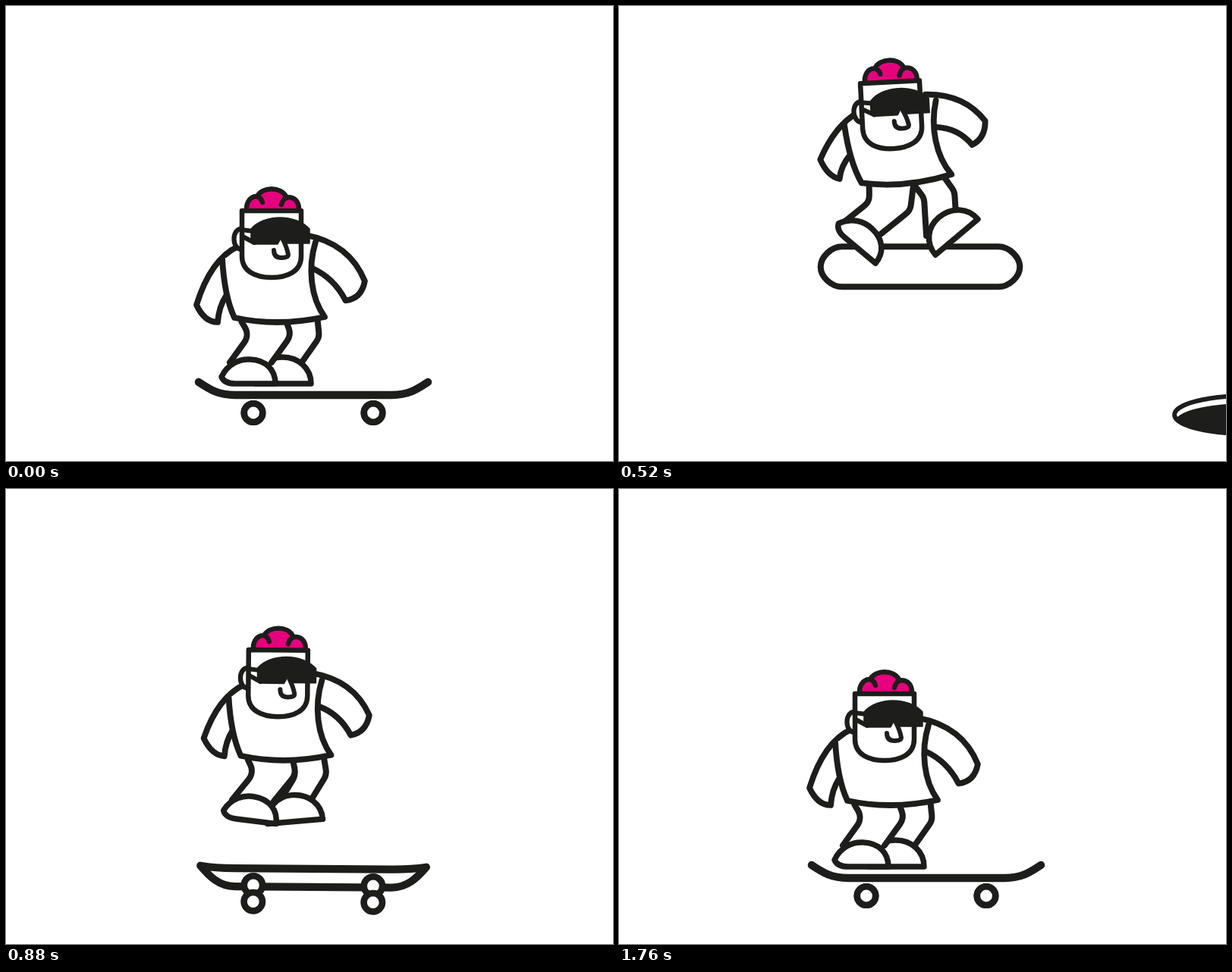
Write an HTML page with a canvas that moves like this. It is 800 by 600 pixels and loops after 1970 ms.

```html
<!DOCTYPE html>
<html lang="en">
<head>
<meta charset="utf-8">
<title>Kickflip</title>
<style>
  html, body { margin: 0; width: 100%; height: 100%; overflow: hidden; background: #fff; }
  canvas { display: block; }
</style>
</head>
<body>
<canvas id="stage" width="800" height="600"></canvas>
<script>
const ctx = document.getElementById('stage').getContext('2d');
const INK = '#1d1d1b', PINK = '#e6007e', LOOP = 1970;
const HOLDS = [1760, 1680, 1520, 1440, 1360];

// Parts are x, y, angle; knees are x, y. Jump height is added by hop().
const rest = {
  head: [350, 270, 0], torso: [360.5, 410.5, 0], raise: [0], board: [405, 513, 0],
  leftKnee: [321, 434], leftFoot: [355, 498, 0],
  rightKnee: [372, 437], rightFoot: [402, 498, 0]
};
const pop = {
  head: [288, 260.5, -5], torso: [308.5, 418.5, -5], raise: [24], board: [383, 474.5, -32],
  leftKnee: [276, 458], leftFoot: [316, 518, -5],
  rightKnee: [324, 446], rightFoot: [358, 488, -5]
};
const spread = {
  head: [357, 288, -3], torso: [379, 415.5, -5], raise: [11], board: [397, 488, 0],
  leftKnee: [330, 446], leftFoot: [338, 527, 40],
  rightKnee: [402, 441], rightFoot: [473, 469, -40]
};
const land = {
  head: [406.5, 291.5, 3.5], torso: [414.5, 422, 0], raise: [12], board: [404.5, 511, 2.5],
  leftKnee: [360, 442], leftFoot: [361, 527, 45],
  rightKnee: [434, 447], rightFoot: [501, 484, -33]
};
const KEYS = [[0, rest], [80, rest], [320, pop], [520, spread], [760, land], [920, rest]];

const P = d => new Path2D(d);
const shape = {
  torso: P('M-75.5-77.5C-74-50-70-22-59.5.5Q-2 13 59.5-.5C41-26 37-65 47.5-99.5'),
  brain: P('M-33 0C-35-15-24-20-19-19C-12-32 12-32 19-19C31-22 38-10 36 0Z'),
  folds: P('M-33-2C-34-18-16-26-12-11M-19-19C-12-32 12-32 19-19M36-2C37-19 16-24 13-8'),
  ear: P('M-39 24C-53 23-53 51-39 51'),
  face: P('M-39 0H39V60C39 80 21 88 0 88S-39 80-39 60Z'),
  temple: P('M-40 25L-24 27M-38 34L-23 42'),
  glasses: P('M-27 24C-10 4 32 4 50 24V43H18L13 35L8 44H-24L-27 41Z'),
  nose: P('M15 38C18 44 21 52 22 58Q22 62 13 62Q3 62 3 52'),
  leftShoe: P('M0 0H-53C-63 0-69-4-71-9C-63-26-47-33-33-32C-12-31 0-18 0 0Z'),
  rightShoe: P('M0 0H-73C-73-20-58-35-38-35C-16-35 0-20 0 0Z')
};

const RAD = Math.PI / 180;
const clamp = u => Math.min(1, Math.max(0, u));
const add = ([a, b], [c, d]) => [a + c, b + d];
const scale = ([a, b], k) => [a * k, b * k];
const spin = ([x, y], deg) => {
  const c = Math.cos(deg * RAD), s = Math.sin(deg * RAD);
  return [x * c - y * s, x * s + y * c];
};
const toStage = (point, [x, y, deg]) => add(spin(point, deg), [x, y]);

const hop = (t, peak, half, height) => height * Math.max(0, 1 - ((t - peak) / half) ** 2);

function squat(t) {
  if (t < 280) return .9 * Math.sin(Math.PI * t / 280) ** 2;
  const sink = Math.sin(clamp((t - 900) / 160) * Math.PI / 2);
  return sink * (1 - clamp((t - 1120) / 640) ** 1.35);
}

// Smooth interpolation through the poses without overshoot.
function pose(part, t) {
  const i = KEYS.findLastIndex(([time]) => time <= t);
  if (i === KEYS.length - 1) return rest[part];
  const slope = (k, n) => KEYS[k] && KEYS[k + 1]
    ? (KEYS[k + 1][1][part][n] - KEYS[k][1][part][n]) / (KEYS[k + 1][0] - KEYS[k][0]) : 0;
  const tangent = (k, n) => {
    const a = slope(k - 1, n), b = slope(k, n);
    return a * b > 0 ? 2 * a * b / (a + b) : 0;
  };
  const [start, from] = KEYS[i], [end, to] = KEYS[i + 1];
  const u = (t - start) / (end - start), v = 1 - u;
  return from[part].map((a, n) => a * v * v * (1 + 2 * u) + to[part][n] * u * u * (1 + 2 * v)
    + (end - start) * u * v * (tangent(i, n) * v - tangent(i + 1, n) * u));
}

function ink(path, width, fill) {
  if (fill) { ctx.fillStyle = fill; ctx.fill(path); }
  ctx.lineWidth = width;
  if (width) ctx.stroke(path);
}

function place([x, y, angle], draw) {
  ctx.save();
  ctx.translate(x, y);
  ctx.rotate(angle * RAD);
  draw();
  ctx.restore();
}

function ellipse(x, y, rx, ry = rx) {
  const p = new Path2D();
  p.ellipse(x, y, rx, ry, 0, 0, 7);
  return p;
}

// Three streaks cross from right to left twice, 920 ms apart.
function drawStreaks(t) {
  const steps = (t < 700 ? t - 320 : t - 1240) / 40;
  const streak = (x, y, length, width, speed) =>
    ink(P(`M${x - steps * speed} ${y}h${length}`), width);
  if (Math.abs(steps) > 9) return;
  streak(145, 37, 85, 5, 98.7);
  streak(128, 86, 120, 7.5, 86.3);
  streak(73, 124, 153, 9.5, 129);
}

function drawHole(t) {
  const x = 204 - (t - 760) * 2.592;
  if (x < -110 || x > 910) return;
  const rim = ellipse(x, 539, 94, 25);
  ctx.save();
  ctx.clip(rim);
  ink(ellipse(x, 549, 94, 25), 0, INK);
  ctx.restore();
  ink(rim, 6);
}

// The deck rolls once around its long axis: edge, top, edge, underside, edge.
function drawBoard(t) {
  const roll = 360 * clamp((t - 385) / 535) * RAD, s = Math.sin(roll), c = Math.cos(roll);
  const edge = Math.abs(c), h = 26.5 * Math.abs(s), k = h * .5;
  const end = 131 + 20 * edge, tip = -17 * c;
  const bend = 117 + 8 * edge, cx = end - 15 * c * c, cy = tip + 10 * c * edge;
  const deck = P(`M-103 ${-h}H103C${bend} ${-h} ${cx} ${cy - k} ${end} ${tip}`
    + `C${cx} ${cy + k} ${bend} ${h} 103 ${h}H-103C${-bend} ${h} ${-cx} ${cy + k} ${-end} ${tip}`
    + `C${-cx} ${cy - k} ${-bend} ${-h} -103 ${-h}Z`);
  const wheels = () => {
    const side = 24 * Math.max(0, -s);
    for (const x of [-79, 79]) for (const y of [-side, side])
      ink(ellipse(x, 23.5 * c + y, 12.2), 8.6, '#fff');
  };
  ctx.save();
  ctx.translate(0, -hop(t, 600, 280, 157));
  place(pose('board', t), () => {
    if (s >= 0) wheels();
    ink(deck, 8 + 2.5 * edge, '#fff');
    if (s < 0) wheels();
  });
  ctx.restore();
}

// Both edges of a leg bend at the knee; the far one is the near one moved sideways.
function drawLeg(hip, farHip, knee, ankle, across) {
  const near = [hip, knee, ankle];
  const far = [farHip, add(knee, across), add(ankle, across)];
  const lines = new Path2D();
  for (const [a, b, c] of [near, far]) {
    lines.moveTo(...a);
    lines.arcTo(...b, ...c, 18);
    lines.lineTo(...c);
  }
  ink(P(`M${near.join('L')}L${far.reverse().join('L')}Z`), 0, '#fff');
  ink(lines, 8);
}

// Drawn around the shoulder: aim and reach give the cuff, all bends follow from it.
function drawArm({ shoulder, neck, armpit, aim, reach, turn, sway, swell, tuck }) {
  const toward = (length, deg) => spin([length, 0], deg);
  const outer = toward(reach, aim), inner = add(outer, toward(36, aim + turn));
  const palm = scale(add(outer, inner), .58);
  place([...shoulder, 0], () => ink(P(`M${neck}Q${toward(reach * swell, aim + sway)} ${outer}`
    + `Q${palm} ${inner}Q${scale(inner, tuck)} ${armpit}`), 7.8, '#fff'));
}

function drawUpperBody(raise) {
  const leftReach = 70 - 4.4 * Math.sqrt(raise), rightReach = 83 - 3.8 * Math.sqrt(raise);
  drawArm({
    shoulder: [-75.5, -77.5], neck: [21, -16], armpit: [5, leftReach * .7],
    aim: 119 + raise, reach: leftReach, turn: -80, sway: 58, swell: .22, tuck: .76
  });
  drawArm({
    shoulder: [47.5, -99.5], neck: [-13, -9], armpit: [-4, 35],
    aim: 38.6 - raise, reach: rightReach, turn: 96, sway: -36, swell: .54, tuck: .62
  });
  ink(shape.torso, 7.8, '#fff');
}

function drawHead() {
  ink(shape.brain, 0, PINK);
  ink(shape.folds, 6.3);
  ink(shape.ear, 6.3, '#fff');
  ink(shape.face, 6.5, '#fff');
  ink(shape.temple, 6);
  ink(shape.glasses, 1.5, INK);
  ink(shape.nose, 6);
}

function drawRider(t) {
  const dip = squat(t), torso = pose('torso', t);
  const left = pose('leftFoot', t), right = pose('rightFoot', t);
  const hip = (x, y) => toStage([x, y], torso);
  ctx.save();
  ctx.translate(0, -hop(t, 640, 280, 230));
  drawLeg(hip(8, 7), hip(50, 3), pose('rightKnee', t),
    toStage([-54 + .3 * right[2], -27], right), spin([41, 0], .3 * right[2]));
  place(right, () => ink(shape.rightShoe, 7.5, '#fff'));
  drawLeg(hip(-50, 6), hip(9, 6), pose('leftKnee', t),
    toStage([-60 - .2 * left[2], -28 + .5 * left[2]], left), spin([55, 0], .3 * left[2]));
  place(left, () => ink(shape.leftShoe, 7.5, '#fff'));
  ctx.translate(0, dip * 11.5);
  place(torso, () => drawUpperBody(Math.max(0, pose('raise', t)[0])));
  ctx.translate(0, dip * 7.5);
  place(pose('head', t), drawHead);
  ctx.restore();
}

function frame() {
  const now = performance.now() % LOOP;
  const t = HOLDS.find(h => now >= h) ?? Math.floor(now / 40) * 40;
  ctx.fillStyle = '#fff';
  ctx.fillRect(0, 0, 800, 600);
  ctx.strokeStyle = INK;
  ctx.lineCap = ctx.lineJoin = 'round';
  drawStreaks(t);
  drawHole(t);
  drawBoard(t);
  drawRider(t);
  requestAnimationFrame(frame);
}
frame();
</script>
</body>
</html>
```
